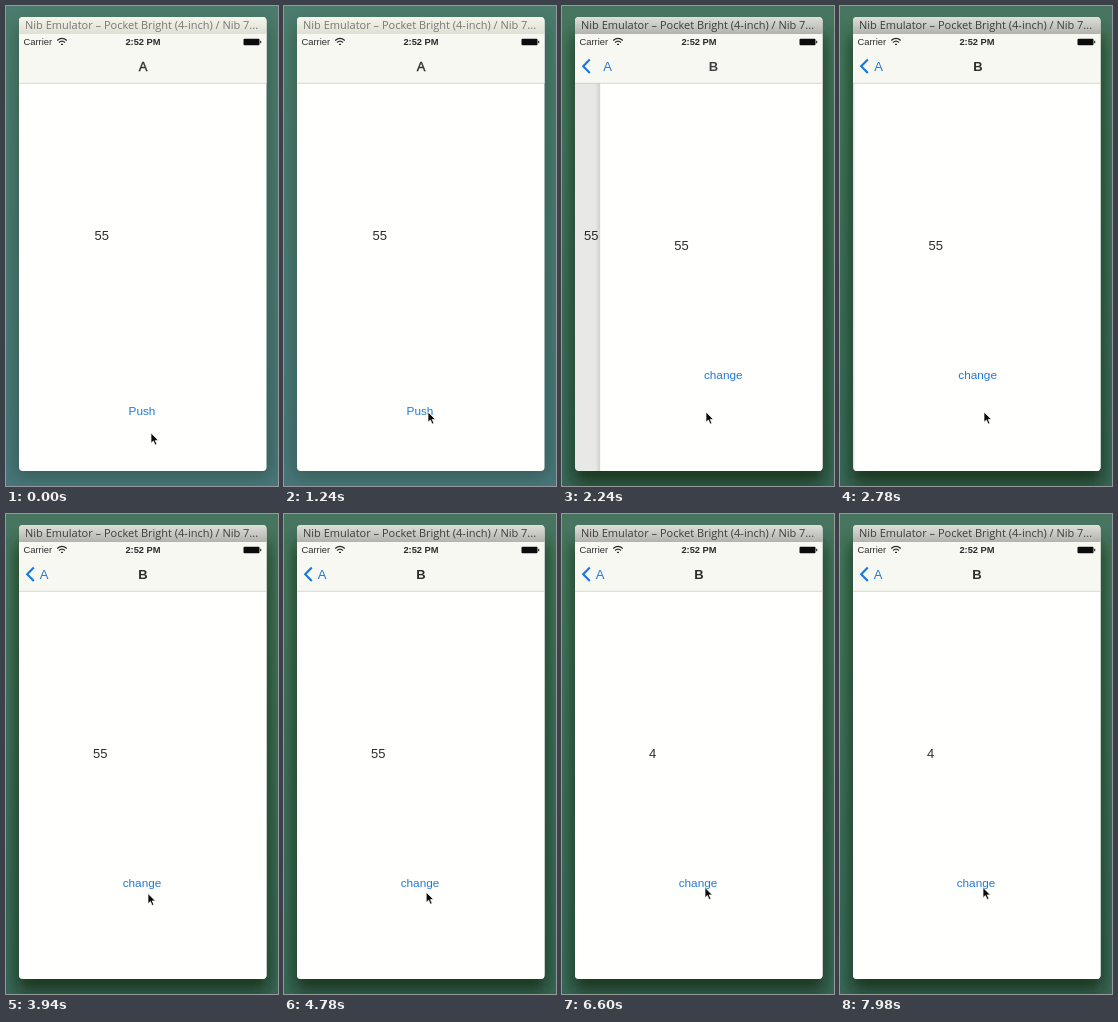
An HTML page that plays this animation: 272 by 480 pixels, repeating every 8000 ms.

```html
<!DOCTYPE html>
<html lang="en">
<head>
<meta charset="utf-8">
<title>Push transition</title>
<style>
  html, body { margin: 0; width: 100%; height: 100%; overflow: hidden; }
  svg { display: block; width: 100vw; height: 100vh; font-family: "Liberation Sans", Arial, sans-serif; }
  text { fill: #2c2c2c; }
  .number { font-size: 13px; }
  .blue { fill: #2379d6; }
  .button { font-size: 11.8px; text-anchor: middle; }
  .center { text-anchor: middle; }
  .bold { font-weight: bold; }
</style>
</head>
<body>
<svg viewBox="0 0 272 480">
  <defs>
    <linearGradient id="wallIdle" x2="0" y2="1">
      <stop stop-color="#4b7b6c"/><stop offset="1" stop-color="#48757a"/>
    </linearGradient>
    <linearGradient id="wallActive" x2="0" y2="1">
      <stop stop-color="#47755f"/><stop offset="1" stop-color="#3b675a"/>
    </linearGradient>
    <linearGradient id="barIdle" x2="0" y2="1">
      <stop stop-color="#f5f5ec"/><stop offset="1" stop-color="#dfdfd4"/>
    </linearGradient>
    <linearGradient id="barActive" x2="0" y2="1">
      <stop stop-color="#dededa"/><stop offset="1" stop-color="#b3b3ae"/>
    </linearGradient>
    <linearGradient id="edge">
      <stop stop-color="#666" stop-opacity="0"/><stop offset="1" stop-color="#666" stop-opacity=".5"/>
    </linearGradient>
    <filter id="blur" x="-30%" y="-30%" width="160%" height="160%"><feGaussianBlur stdDeviation="8"/></filter>
    <clipPath id="window"><rect x="13" y="11" width="247.5" height="454" rx="4"/></clipPath>
  </defs>

  <rect id="wall" width="272" height="480"/>
  <rect id="shadow" x="11" width="252" height="450" rx="6" fill="#0a2a08" filter="url(#blur)"/>

  <g clip-path="url(#window)">
    <rect x="13" y="11" width="248" height="454" fill="#fffffd"/>

    <g id="pageA">
      <text class="number" x="88.5" y="234">55</text>
      <text id="push" class="button blue" x="136" y="409">Push</text>
    </g>
    <rect id="dim" x="13" y="77" width="248" height="388" fill="#000008"/>

    <g id="pageB">
      <rect id="edgeShade" x="8" y="77" width="5" height="388" fill="url(#edge)"/>
      <rect x="13" y="77" width="248" height="388" fill="#fffffd"/>
      <text id="number" class="number" x="87" y="244">55</text>
      <text id="change" class="button blue" x="136" y="373">change</text>
    </g>

    <rect x="13" y="27" width="248" height="50" fill="#f8f8f3"/>
    <path d="M13 77.3h248" stroke="#c6c6c0" stroke-width=".7"/>
    <text id="titleA" class="center" y="64.5" font-size="13" stroke="#2c2c2c" stroke-width=".4">A</text>
    <text id="titleB" class="center bold" y="64.5" font-size="13">B</text>
    <g id="back">
      <path d="M27.8 53.5l-6.6 6.8 6.6 6.8" fill="none" stroke="#1878e0" stroke-width="2.1"/>
      <text id="backLabel" class="blue" y="64.8" font-size="13">A</text>
    </g>

    <text x="17.5" y="39" font-size="9.4">Carrier</text>
    <g fill="none" stroke="#2c2c2c" stroke-width="1.2">
      <path d="M51.2 34.5q4.8-4.4 9.6 0M53 36.5q3-2.7 6 0"/>
      <path d="M55 38.3h2"/>
    </g>
    <text class="center bold" x="137" y="39" font-size="9.3">2:52 PM</text>
    <rect x="237.5" y="32.8" width="16" height="6.4" rx="1" fill="#0c0c0c"/>
    <rect x="254.2" y="34.8" width="1" height="2.4" fill="#0c0c0c"/>

    <rect id="bar" x="13" y="11" width="248" height="17"/>
    <text id="caption" x="19" y="23.3" font-size="11" font-family="Open Sans, sans-serif">Nib Emulator – Pocket Bright (4-inch) / Nib 7...</text>
  </g>

  <path id="cursor" d="M0 0v10.2l2.4-2.2 1.7 4 1.8-.8-1.7-3.8h3.2z" fill="#0c0c0c" stroke="#fff" stroke-width=".7"/>
</svg>

<script>
const LOOP = 8000, ACTIVATE = 1300, PUSH_START = 1604, NUMBER_CHANGE = 5660;
const WIDTH = 248;
const $ = id => document.getElementById(id);
const set = (id, attrs) => {
  for (const name in attrs) $(id).setAttribute(name, attrs[name]);
};
const clamp = v => Math.min(1, Math.max(0, v));
const mix = (a, b, k) => a + (b - a) * k;
const smooth = v => { v = clamp(v); return v * v * (3 - 2 * v); };

// Critically damped spring from 0 to 1
const spring = ms => {
  const x = Math.max(0, ms) * 0.00607;
  return 1 - (1 + x) * Math.exp(-x);
};

// Button dims while pressed, then fades back
const buttonOpacity = (t, down, up) => t < down ? 1 : mix(0.27, 1, clamp((t - up) / 350));

// Cursor stops: departure, arrival, x, y
const stops = [[500, 1200, 144, 406], [2900, 3650, 142, 379.5], [4600, 5200, 143, 373.5]];
function cursorAt(t) {
  let x = 145, y = 427;
  for (const [start, end, toX, toY] of stops) {
    const k = smooth((t - start) / (end - start));
    x = mix(x, toX, k);
    y = mix(y, toY, k);
  }
  return [x, y];
}

function draw(t) {
  const p = spring(t - PUSH_START), rest = 1 - p;
  const active = t >= ACTIVATE;

  set("wall", { fill: active ? "url(#wallActive)" : "url(#wallIdle)" });
  set("shadow", { y: active ? 28 : 20, opacity: active ? 0.75 : 0.35 });
  set("bar", { fill: active ? "url(#barActive)" : "url(#barIdle)" });
  $("caption").style.fill = active ? "#3c3c3a" : "#787874";

  set("pageA", { transform: `translate(${-74 * p})` });
  set("pageB", { transform: `translate(${WIDTH * rest})` });
  set("dim", { opacity: 0.1 * p });
  set("edgeShade", { opacity: clamp(4 * p * rest) });
  set("titleA", { x: 137 - 75 * p, opacity: clamp(1 - 1.2 * p) });
  set("titleB", { x: 137 + 142 * rest, opacity: p });
  set("back", { opacity: clamp((p - 0.4) / 0.5) });
  set("backLabel", { x: 33.8 + 74 * rest });

  set("push", { opacity: buttonOpacity(t, 1540, 1720) });
  set("change", { opacity: buttonOpacity(t, 5480, NUMBER_CHANGE) });
  $("number").textContent = t < NUMBER_CHANGE ? "55" : "4";
  set("cursor", { transform: `translate(${cursorAt(t)})` });
}

const origin = performance.now();
function tick() {
  draw((performance.now() - origin) % LOOP);
  requestAnimationFrame(tick);
}
tick();
</script>
</body>
</html>
```
